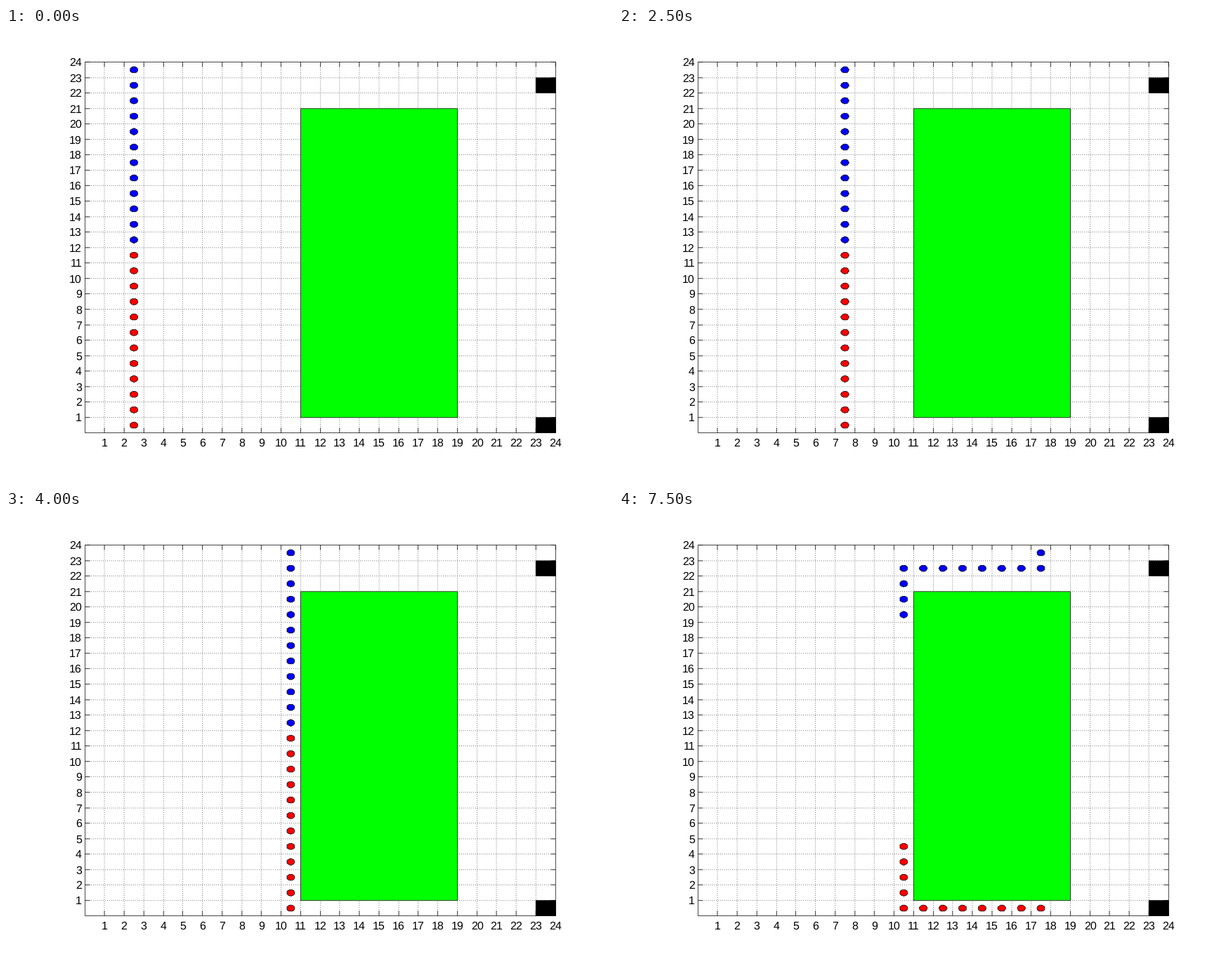
Animation of 864x648 px, one loop 8000 ms. Source, as a matplotlib script:

```python
import numpy as np
import matplotlib.pyplot as plt
from matplotlib.animation import FuncAnimation
from matplotlib.patches import Polygon

W, H, DPI = 864, 648, 72
FRAMES, STEP_MS = 16, 500

# The plot is laid out on a fine pixel grid and shown at a smaller scale.
FINE_W, FINE_H = 1200, 900
SCALE = W / FINE_W
CELLS = 24
LEFT, BASE = 0.13 * FINE_W, 0.11 * FINE_H
CELL_W = 0.775 * FINE_W / CELLS
CELL_H = 0.815 * FINE_H / CELLS
TICK = 9.5

RADIUS = 0.2
TEAM = 12
START_X, WALL_X = 2.5, 10.5
ANGLES = np.linspace(0, 2 * np.pi, 40, endpoint=False)

plt.rcParams["font.family"] = "Liberation Sans"
plt.rcParams["text.hinting"] = "none"

fig = plt.figure(figsize=(W / DPI, H / DPI), dpi=DPI, facecolor="white")
ax = fig.add_axes([0, 0, 1, 1])
ax.set_xlim(0, FINE_W)
ax.set_ylim(FINE_H, 0)
ax.axis("off")


def to_px(x, y):
    """Map grid coordinates to centres of fine pixels."""
    return (np.floor(LEFT + CELL_W * np.asarray(x)) + 0.5,
            FINE_H - np.floor(BASE + CELL_H * np.asarray(y)) - 0.5)


def line(xs, ys, z=3, style="-"):
    ax.plot(xs, ys, color="black", lw=SCALE, ls=style, zorder=z, snap=False,
            dash_capstyle="butt", solid_capstyle="butt")


def shape(points, color, z):
    patch = Polygon(points, closed=True, facecolor=color, edgecolor="black",
                    lw=SCALE, zorder=z, snap=False, joinstyle="round")
    return ax.add_patch(patch)


def block(x0, y0, x1, y1, color):
    xs, ys = to_px([x0, x1, x1, x0], [y0, y0, y1, y1])
    shape(np.column_stack([xs, ys]), color, 2)


def label(x, y, text, ha):
    ax.text(x, y, text, size=16, ha=ha, va="baseline")


def draw_board():
    dots = (0, (1, 3))
    (x0, x1), (y1, y0) = to_px([0, CELLS], [0, CELLS])
    for i in range(1, CELLS + 1):
        px, py = to_px(i, i)
        if i < CELLS:
            line([px, px], [y1 + 0.5, y0], 1, dots)
            line([x0 - 0.5, x1], [py, py], 1, dots)
        line([px, px], [y1, y1 - TICK])
        line([px, px], [y0, y0 + TICK])
        line([x0, x0 + TICK], [py, py])
        line([x1, x1 - TICK], [py, py])
        label(px, 596 / SCALE, str(i), "center")
        label(108 / SCALE, py + 5.7 / SCALE, str(i), "right")
    for y in (y0, y1):
        line([x0 - 0.5, x1 + 0.5], [y, y])
    for x in (x0, x1):
        line([x, x], [y0, y1])
    block(11, 1, 19, 21, "#00ff00")
    block(23, 22, 24, 23, "black")
    block(23, 0, 24, 1, "black")


def disc(x, y):
    return np.column_stack(to_px(x + RADIUS * np.cos(ANGLES),
                                 y + RADIUS * np.sin(ANGLES)))


def red_pos(i, n):
    """Members counted from the bottom; they turn along the lowest row."""
    k = n - (WALL_X - START_X)
    if k <= 0:
        return START_X + n, 0.5 + i
    return WALL_X + max(0, k - i), max(0.5, 0.5 + i - k)


def blue_pos(i, n):
    """Members counted from the top; the first keeps its own row."""
    k = n - (WALL_X - START_X)
    if k <= 0:
        return START_X + n, 23.5 - i
    if i == 0:
        return WALL_X + k, 23.5
    return WALL_X + max(0, k - i + 1), min(22.5, 23.5 - i + k)


draw_board()
reds = [shape(disc(*red_pos(i, 0)), "#ff0000", 4) for i in range(TEAM)]
blues = [shape(disc(*blue_pos(i, 0)), "#0000ff", 4) for i in range(TEAM)]


def update(n):
    for i in range(TEAM):
        reds[i].set_xy(disc(*red_pos(i, n)))
        blues[i].set_xy(disc(*blue_pos(i, n)))
    return reds + blues


anim = FuncAnimation(fig, update, frames=FRAMES, interval=STEP_MS,
                     repeat=True, repeat_delay=0, blit=False)
plt.show()
```
